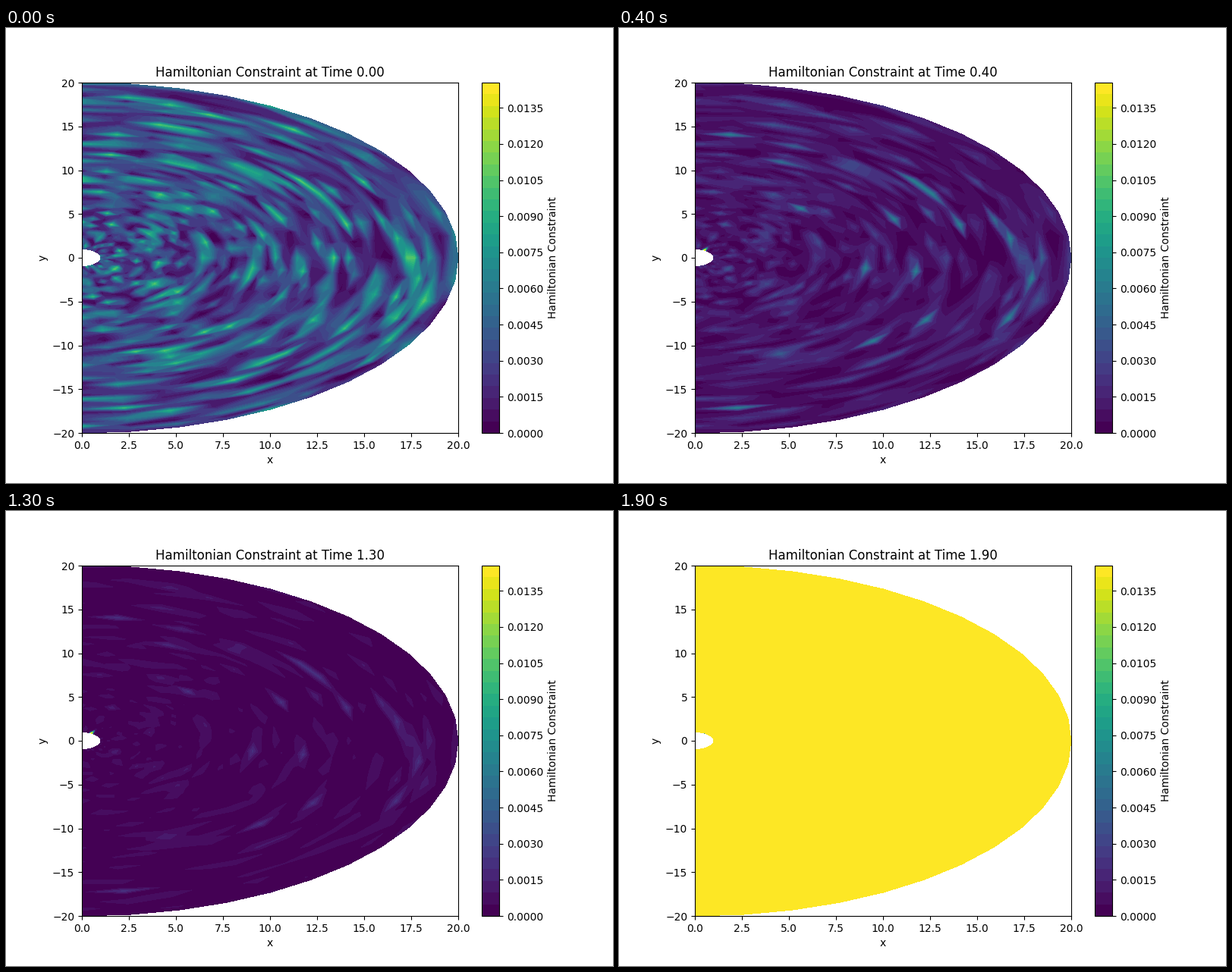
Write a matplotlib script that moves like this. It is 800 by 600 pixels and loops after 2 s.

```python
import numpy as np
import matplotlib.pyplot as plt
from matplotlib.animation import FuncAnimation
from matplotlib.cm import ScalarMappable
from matplotlib.colors import ListedColormap, Normalize

FRAMES, STEP_MS = 20, 100
TOP, BANDS = 0.01455, 30
N_THETA, N_R = 25, 50

theta = np.linspace(-np.pi / 2, np.pi / 2, N_THETA)
radius = np.linspace(1, 20, N_R)
T, R = np.meshgrid(theta, radius, indexing="ij")
X, Y = R * np.cos(T), R * np.sin(T)

# The most lasting bright spots, as (x, y)
SPOTS = [(16.9, 2.3), (9.2, -0.8), (11.7, -1.6), (10.6, 4.4),
         (12.2, -6.9), (16.7, -6.8), (17.9, -2.3), (5.6, 5.8),
         (9.6, -9.6), (2.3, -17.1), (1.8, 14.1), (12.5, 7.6)]
HOT = (20, 0)  # node on the inner rim where the run blows up

# Noise at each node, and the share of it that fades slowly
rng = np.random.default_rng(12)
noise = np.minimum(np.abs(rng.normal(0, 0.0043, T.shape)), 0.0105)
slow = rng.uniform(0.3, 0.55, T.shape)
slow[rng.random(T.shape) < 0.04] = 0.9
for x, y in SPOTS:
    node = np.unravel_index(np.hypot(X - x, Y - y).argmin(), T.shape)
    noise[node], slow[node] = 0.0095, 1


def field(frame):
    t = frame * STEP_MS / 1000
    if frame == FRAMES - 1:
        z = np.full(T.shape, 2 * TOP)
        z[HOT] = 0.002
        return z
    fade = np.exp(-t) - 0.04 * t
    z = noise * fade * (slow + (1 - slow) * np.exp(-8 * t))
    if frame > 0:
        z[HOT] = 1.1 * TOP
    return z


colors = plt.get_cmap("viridis")(np.linspace(0, 1, BANDS))
levels = np.linspace(0, TOP, BANDS + 1)

fig, ax = plt.subplots(figsize=(8, 6), dpi=100)
bar = fig.colorbar(ScalarMappable(Normalize(0, TOP), ListedColormap(colors)),
                   ax=ax, ticks=np.arange(0, TOP, 0.0015), format="%.4f")
bar.set_label("Hamiltonian Constraint")


def draw(frame):
    ax.clear()
    ax.contourf(X, Y, field(frame), levels=[*levels, 10 * TOP],
                colors=[*colors, colors[-1]])
    ax.set(xlim=(0, 20), ylim=(-20, 20), xlabel="x", ylabel="y",
           title=f"Hamiltonian Constraint at Time {frame * 0.1:.2f}")
    return []


anim = FuncAnimation(fig, draw, frames=FRAMES, init_func=lambda: draw(0),
                     interval=STEP_MS, repeat=True, repeat_delay=0)
plt.show()
```
